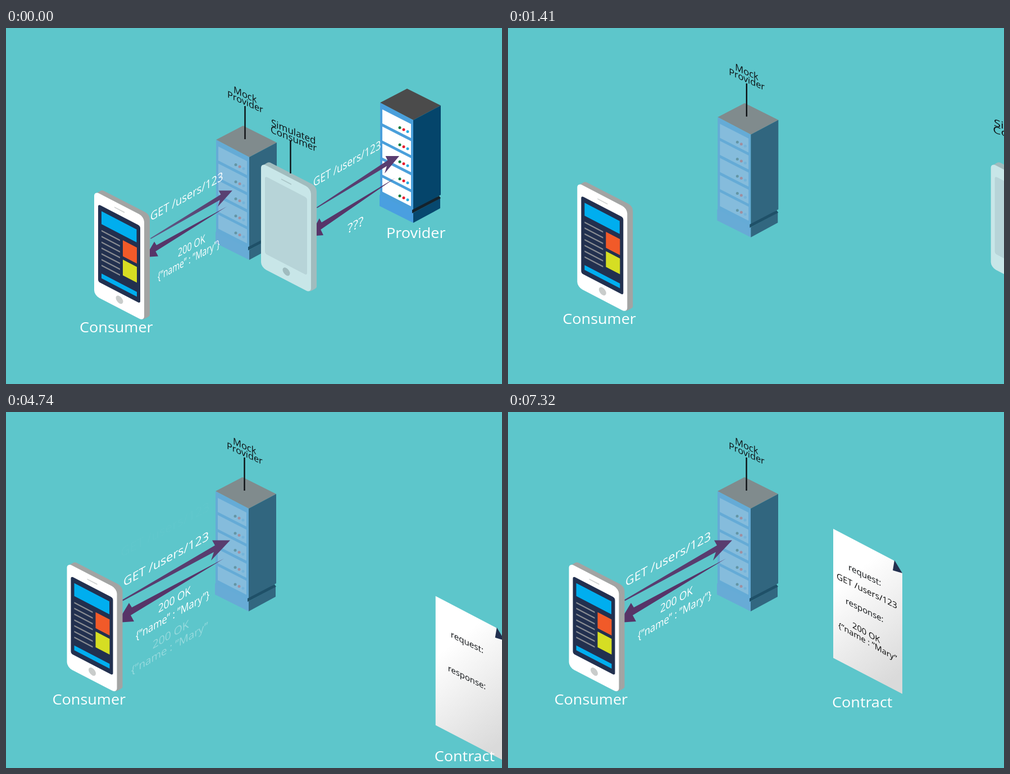
An HTML page that plays this animation: 883 px wide and 634 px high, repeating every 7.35 s.

```html
<!DOCTYPE html>
<html lang="en">
<head>
<meta charset="utf-8">
<title>Contract testing</title>
<style>
  html, body { margin: 0; width: 100%; height: 100%; overflow: hidden; background: #5dc6cb; }
  svg { display: block; width: 100%; height: 100%; }
  text { font-family: "Open Sans", "Noto Sans", sans-serif; white-space: pre; }
</style>
</head>
<body>
<svg id="stage" viewBox="0 0 883 634"></svg>
<script>
const LOOP = 7350;
const $ = id => document.getElementById(id);

const poly = (points, fill) => `<polygon points="${points}" fill="${fill}"/>`;
const rect = (x, y, w, h, fill, r = 0) =>
  `<rect x="${x}" y="${y}" width="${w}" height="${h}" rx="${r}" fill="${fill}"/>`;
const group = (id, body, attrs = '') => `<g id="${id}" ${attrs}>${body}</g>`;

// Text on a sheared plane: sx is the width scale, slope the rise per pixel
const label = (s, x, y, size, slope = 0, sx = 1, fill = '#fff') =>
  `<text transform="matrix(${sx} ${slope * sx} 0 1 ${x} ${y})" font-size="${size}" fill="${fill}">${s}</text>`;
const caption = (s, x, y) => label(s, x, y, 25, 0, 1.08);

function server(c) {
  let rows = '';
  for (let i = 0; i < 5; i++) {
    const y = 145 + i * 30.4;
    rows += poly(`670,${y} 721,${y + 26} 721,${y + 51} 670,${y + 25}`, c.panel);
    c.dots.forEach((fill, k) =>
      rows += `<circle cx="${701 + k * 7}" cy="${y + 32.5 + k * 3.5}" r="2.5" fill="${fill}"/>`);
  }
  return poly('666,133 714,108 774,138 725,164', c.top)
    + poly('666,133 725,164 725,330 666,299', c.front)
    + poly('725,164 774,138 774,297 725,328', c.side)
    + poly('665,297 725,327 725,347 665,317', c.base)
    + poly('725,329 773,303 773,321 725,347', c.foot)
    + poly('723,324 771,299 774,303 723,330', c.gap)
    + rows;
}

function phone(c, screen) {
  return `<path d="M158 296L168 290Q172 288 176 291L248 328Q256 333 256 341V511Q256 514 244 519Z" fill="${c.side}"/>`
    + `<g transform="matrix(1 .52 0 1 157 290)">`
    + rect(0, 0, 89, 186, c.body, 9)
    + rect(7, 20, 75, 138, c.screen, 4)
    + rect(36, 9.5, 18, 1.8, c.speaker)
    + `<circle cx="45" cy="170.5" r="6.5" fill="${c.button}"/>${screen}</g>`;
}

function appScreen() {
  let s = rect(13, 29.5, 62.5, 23, '#00aeef') + rect(51, 61.5, 25, 28.5, '#f15a29')
    + rect(51, 96, 25, 28, '#d6de23') + rect(13, 140.5, 63, 8.5, '#00aeef');
  for (let i = 0; i < 7; i++) s += rect(13, 63 + i * 10.3, 33, 2.5, '#8a8d93');
  return s;
}

// Arrows are defined from their tail point
const arrow = (points, x, y, sx, sy, fill) =>
  `<polygon points="${points}" transform="translate(${x} ${y}) scale(${sx} ${sy})" fill="${fill}"/>`;
const outArrow = (x, y, sx = 1, sy = 1, fill = '#593c6f') =>
  arrow('0,-1 165,-98 160,-107 192,-107 158,-71 163,-86 1,1', x, y, sx, sy, fill);
const backArrow = (x, y, sx = 1, sy = 1) =>
  arrow('0,0 -164,87 -169,79 -190,114 -160,112 -166,101', x, y, sx, sy, '#573468');

const INK = '#0c0f12';
const GET = 'GET /users/123';
const pole = (x, y) => rect(x - 1.2, y, 2.4, 59, INK);

const solid = {
  top: '#4b4b4b', front: '#4a9fdb', side: '#05456b', base: '#4a9fe0', foot: '#07486f',
  gap: '#14222c', panel: '#fff', dots: ['#0f7a3c', '#e8182a', '#29abe2']
};
const ghost = {
  top: '#808b8d', front: '#65abd6', side: '#31667f', base: '#67abd6', foot: '#326780',
  gap: '#1f5068', panel: '#85bcdc', dots: ['#6396a6', '#a08fa0', '#74b4da']
};
const realPhone = { side: '#a2a4a3', body: '#fff', screen: '#22304f', speaker: '#cfd1d1', button: '#c9cccb' };
const ghostPhone = { side: '#a1bcbe', body: '#c8e6e8', screen: '#b7d4d8', speaker: '#a9c5c7', button: '#a0bcbf' };

$('stage').innerHTML = `
<defs>
  <clipPath id="outClip"><rect id="outWipe" x="200" y="150" width="0" height="250"/></clipPath>
  <clipPath id="backClip"><rect id="backWipe" x="395" y="200" width="0" height="250"/></clipPath>
  <linearGradient id="paper" x1=".35" y1=".25" x2=".6" y2="1">
    <stop stop-color="#fff"/><stop offset="1" stop-color="#dadada"/>
  </linearGradient>
  <linearGradient id="tail"><stop offset="0" stop-color="#5f5a86"/><stop offset=".8" stop-color="#593f70"/></linearGradient>
</defs>`
+ group('mock', `<g transform="translate(-292 66)">${server(ghost)}</g>`
    + pole(425.5, 139)
    + label('Mock', 405, 115, 16.5, .45, 1, INK)
    + label('Provider', 394, 123, 16.3, .45, 1, INK))
+ group('provider', server(solid) + caption('Provider', 677, 374))
+ group('intro',
    outArrow(257, 375, .76, .8, 'url(#tail)') + backArrow(393, 318, .763, .79)
    + outArrow(553, 320, .766, .86) + backArrow(693, 267, .8, .91)
    + label(GET, 257, 344, 21, -.57, .87)
    + label('200 OK', 306, 408, 20, -.55, .72)
    + label('{”name” : ”Mary”}', 270, 450, 20, -.54, .69)
    + label(GET, 547, 283, 21, -.57, .81)
    + label('???', 608, 366, 22, -.55))
+ group('out', outArrow(207, 335.5) + label(GET, 209, 311, 21.5, -.55), 'clip-path="url(#outClip)"')
+ group('back', backArrow(388, 261)
    + label('200 OK', 271, 358, 20, -.59, .86)
    + label('{”name” : ”Mary”}', 231, 406, 20, -.57, .82), 'clip-path="url(#backClip)"')
+ group('getCopy', label(GET, 205, 267, 22.3, -.53))
+ group('okCopy', label('200 OK', 262, 414, 19.3, -.6) + label('{”name : ”Mary”', 224, 459, 18.8, -.59))
+ group('consumer', phone(realPhone, appScreen()) + caption('Consumer', 131, 542))
+ group('sim', `<g transform="translate(297 -50)">${phone(ghostPhone, '')}</g>`
    + pole(506.5, 200)
    + group('simText', label('Simulated', -40, 174, 17, .42, 1, INK) + label('Consumer', -41, 186, 17, .42, 1, INK)))
+ group('paperSheet', poly('579,208 688,265 702,287 702,502 579,438', 'url(#paper)')
    + poly('688,264 702,287 685,282', '#22304f')
    + label('request:', 606, 281, 15.2, .5, 1, INK)
    + label('response:', 601, 341, 14.8, .5, 1, INK))
+ group('paperName', caption('Contract', 577, 525.5))
+ group('getEntry', label(GET, 0, 0, 20, .5, 1, 'inherit'))
+ group('okEntry', label('200 OK', 31, 0, 18, .57, 1, 'inherit')
    + label('{”name : ”Mary”', 0, 0, 17.7, .58, 1, 'inherit'));

const ramp = (t, from, to) => Math.min(1, Math.max(0, (t - from) / (to - from)));
const mix = (a, b, p) => a + (b - a) * p;
const set = (id, name, value) => $(id).setAttribute(name, value);
const move = (id, x, y, rest = '') => set(id, 'transform', `translate(${x} ${y}) ${rest}`);
const fade = (id, alpha) => set(id, 'opacity', alpha);

function draw(t) {
  fade('intro', 1 - ramp(t, 0, 240));

  const away = 443 * ramp(t, 120, 1530);
  move('provider', away, 0);
  move('sim', away, 0);
  move('simText', 512, 0, `scale(${1 + away * .0008} 1)`);

  const shift = ramp(t, 1140, 1530);
  move('mock', -shift, -58 * shift);
  move('consumer', -48.5 * shift, -21.5 * shift);

  set('outWipe', 'width', 200 * ramp(t, 1785, 2430));
  const back = 200 * ramp(t, 2910, 3510);
  set('backWipe', 'x', 395 - back);
  set('backWipe', 'width', back);

  // Copies drift off the arrows, then fade away
  const drift = ramp(t, 3450, 3950) - .84;
  move('getCopy', -4 * drift, -50 * drift);
  move('okCopy', -8 * drift, 52 * drift);
  fade('getCopy', ramp(t, 3630, 4110) * (1 - ramp(t, 4350, 4750)));
  fade('okCopy', ramp(t, 3750, 4230) * (1 - ramp(t, 4450, 4900)));

  const left = 1 - ramp(t, 4260, 5460);
  move('paperSheet', 310 * left, 200 * left);
  move('paperName', 310 * left, 161 * left);

  // Entries shrink into the contract and turn to ink
  const land = ramp(t, 5400, 6210);
  const ink = mix(255, 10, ramp(land, .35, .9));
  move('getEntry', mix(457, 585, land), mix(296, 297, land), `scale(${mix(1, .76, land)})`);
  move('okEntry', mix(466, 588, land), mix(404, 384, land), `scale(${mix(1, .81, land)})`);
  fade('getEntry', ramp(t, 4980, 5460));
  fade('okEntry', ramp(t, 5130, 5610));
  for (const id of ['getEntry', 'okEntry']) set(id, 'fill', `rgb(${ink},${ink},${ink})`);
}

function tick() {
  draw(performance.now() % LOOP);
  requestAnimationFrame(tick);
}
tick();
</script>
</body>
</html>
```
